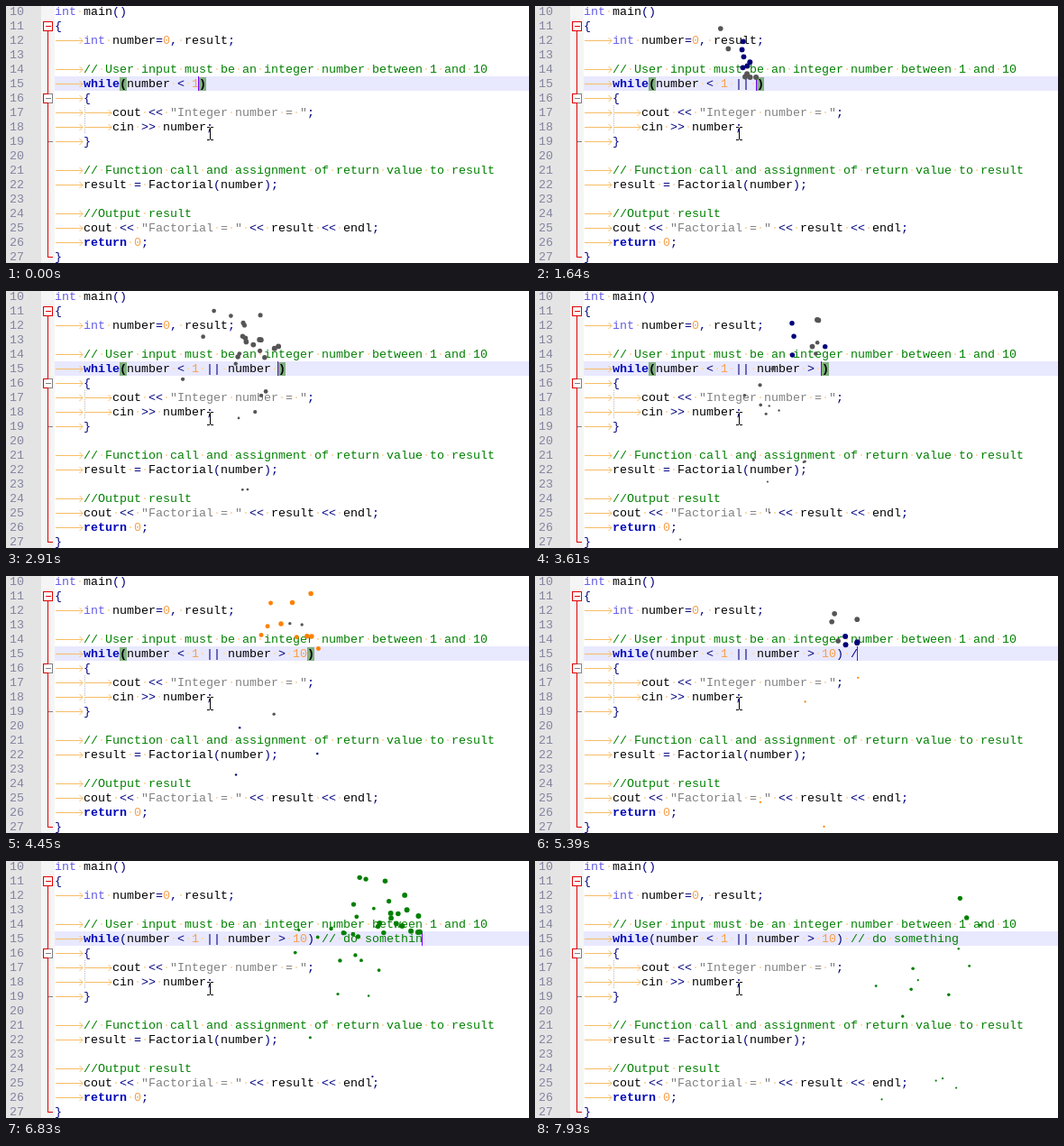
Animation of 580x285 px, one loop 8000 ms. Source, as an HTML page with a canvas:

```html
<!DOCTYPE html>
<html lang="en">
<head>
<meta charset="utf-8">
<title>Typing with sparks</title>
<style>
html, body { margin: 0; width: 100%; height: 100%; overflow: hidden; background: #fff; }
#stage { position: relative; width: 580px; height: 285px; overflow: hidden;
  font: 13.333px/16px "Liberation Mono", "Courier New", monospace; }
#stage > * { position: absolute; }
#nums { left: 0; top: 0; width: 39px; height: 285px; background: #e4e4e4; }
#fold { left: 39px; top: 0; width: 15px; height: 285px; background: #f5f5f5; }
#now { left: 54px; top: 78px; width: 526px; height: 16px; background: #e8e8ff; }
.num { left: 4px; color: #8484a0; }
.row { left: 54px; height: 16px; white-space: pre; color: #000; }
.tab { display: inline-block; width: 32px; height: 16px; vertical-align: top; }
.tab svg { display: block; }
.sp { background: linear-gradient(#ffdcae, #ffdcae) 3px 6px / 2px 2px no-repeat; }
.kw { color: #0008b8; font-weight: bold; }
.ty { color: #625ae6; }
.no { color: #f8a04c; }
.st { color: #808080; }
.op { color: #000080; }
.co { color: #008000; }
.br { color: #000; font-weight: bold; background: #80b080; }
#caret { top: 78px; width: 1px; height: 16px; background: #8000ff; }
#over, #sparks { left: 0; top: 0; }
#mouse { left: 222px; top: 133px; }
</style>
</head>
<body>
<div id="stage">
  <div id="nums"></div>
  <div id="fold"></div>
  <div id="now"></div>
  <svg id="over" width="580" height="285" fill="none" shape-rendering="crispEdges">
    <path d="M46.5 28V278.5H52" stroke="#e00000"/>
    <path d="M47 150.5H52" stroke="#808080"/>
    <rect x="41.5" y="17.5" width="10" height="10" fill="#fff" stroke="#e00000"/>
    <path d="M44 22.5H50" stroke="#e00000"/>
    <rect x="41.5" y="97.5" width="10" height="10" fill="#fff" stroke="#808080"/>
    <path d="M47 97.5H41.5V107.5H47" stroke="#e00000"/>
    <path d="M44 102.5H50" stroke="#808080"/>
    <path d="M87.5 110V142" stroke="#b8b8b8" stroke-dasharray="1 1"/>
  </svg>
  <div id="caret"></div>
  <svg id="mouse" width="10" height="17" fill="none" stroke="#000" shape-rendering="crispEdges">
    <path d="M1 1.5H4M5 1.5H8M4.5 2V15M1 15.5H4M5 15.5H8"/>
  </svg>
  <canvas id="sparks" width="580" height="285"></canvas>
</div>
<script>
const LOOP = 8000, FIRST = 10, EDIT = 15;
const LEFT = 86, CELL = 8, START_Y = 84, GRAVITY = 290;
const stage = document.getElementById('stage');
const caret = document.getElementById('caret');
const ctx = document.getElementById('sparks').getContext('2d');

const code = [
  'int main()',
  '{',
  '\tint number=0, result;',
  '',
  '\t// User input must be an integer number between 1 and 10',
  '',
  '\t{',
  '\t\tcout << "Integer number = ";',
  '\t\tcin >> number;',
  '\t}',
  '',
  '\t// Function call and assignment of return value to result',
  '\tresult = Factorial(number);',
  '',
  '\t//Output result',
  '\tcout << "Factorial = " << result << endl;',
  '\treturn 0;',
  '}'
];

// Typed pieces: text, time of the first key, gap between keys (ms)
const head = 'while(number < 1';
const pieces = [
  [' || ', 1180, 133],
  ['number ', 1960, 130],
  ['> ', 3060, 200],
  ['10', 3700, 200],
  [') ', 4780, 180],
  ['// do ', 5300, 146],
  ['somethin', 6180, 86],
  ['g', 7300, 0]
];
const keys = pieces.flatMap(([text, start, gap]) =>
  [...text].map((ch, i) => ({ ch, at: start + i * gap })));
const fullLine = head + keys.map(k => k.ch).join('');
const closeCol = fullLine.indexOf(')') + 1;
const commentCol = fullLine.indexOf('//') + 1;

const rules = [
  ['co', /^\/\/.*/],
  ['st', /^"[^"]*"/],
  ['kw', /^(while|return)\b/],
  ['ty', /^int\b/],
  ['no', /^\d+/],
  ['', /^\w+/],
  ['op', /^[^\w\s]/],
  ['', /^ /],
  ['tab', /^\t/]
];
const arrow = '<span class="tab"><svg width="32" height="16" fill="none" stroke="#f7bd66">' +
  '<path d="M1 7.5H31M27.5 4l3.5 3.5-3.5 3.5"/></svg></span>';

function escapeText(s) {
  return s.replace(/&/g, '&amp;').replace(/</g, '&lt;').replace(/>/g, '&gt;')
    .replace(/ /g, '<span class="sp"> </span>');
}

function paint(line, braces) {
  let html = '';
  while (line) {
    const [kind, rule] = rules.find(r => r[1].test(line));
    const word = line.match(rule)[0];
    const cls = braces && /^[()]$/.test(word) ? 'br' : kind;
    html += kind === 'tab' ? arrow : `<span class="${cls}">${escapeText(word)}</span>`;
    line = line.slice(word.length);
  }
  return html;
}

function addRow(cls, n, html) {
  const el = document.createElement('div');
  el.className = cls;
  el.style.top = (n - FIRST) * 16 - 1 + 'px';
  el.innerHTML = html;
  stage.insertBefore(el, caret);
  return el;
}

code.forEach((line, i) => {
  addRow('num', FIRST + i, FIRST + i);
  if (FIRST + i !== EDIT) addRow('row', FIRST + i, paint(line));
});
const editRow = addRow('row', EDIT, '');

let seed = 11;
function between(a, b) {
  seed = (seed * 16807) % 2147483647;
  return a + (b - a) * seed / 2147483647;
}

function sparkColor(ch, col) {
  if (col > commentCol) return '#008000';
  if (/\d/.test(ch)) return '#ff8000';
  return /[\w ]/.test(ch) ? '#555' : '#00007a';
}

// Every inserted character throws up a few sparks; the closing bracket is only stepped over
const sparks = keys.flatMap(({ ch, at }, i) => {
  const col = head.length + i + 1;
  const count = ch === ')' ? 0 : Math.floor(between(2, 6));
  return Array.from({ length: count }, () => ({
    at,
    color: sparkColor(ch, col),
    x: LEFT + col * CELL - between(0, 12),
    vx: between(-50, 35),
    vy: between(-200, -85),
    life: between(1.2, 1.75)
  }));
});

function drawSparks(t) {
  ctx.clearRect(0, 0, 580, 285);
  for (const s of sparks) {
    const age = (t - s.at) / 1000;
    if (age < 0 || age >= s.life) continue;
    const y = START_Y + s.vy * age + GRAVITY * age * age / 2;
    const r = Math.max(1.1, 3 * (1 - (age / 1.8) ** 2));
    ctx.fillStyle = s.color;
    ctx.beginPath();
    ctx.arc(s.x + s.vx * age, y, r, 0, Math.PI * 2);
    ctx.fill();
  }
}

let shownCol = -1;
function render(t) {
  const typed = keys.filter(k => k.at <= t).length;
  const col = head.length + typed;
  if (col !== shownCol) {
    shownCol = col;
    const line = fullLine.slice(0, col) + (col < closeCol ? ')' : '');
    editRow.innerHTML = arrow + paint(line, col <= closeCol);
    caret.style.left = LEFT + col * CELL - 1 + 'px';
  }
  const idle = typed ? t - keys[typed - 1].at : 0;
  caret.style.visibility = idle % 1060 < 530 ? 'visible' : 'hidden';
  drawSparks(t);
}

const begin = performance.now();
function tick() {
  render((performance.now() - begin) % LOOP);
  requestAnimationFrame(tick);
}
tick();
</script>
</body>
</html>
```
